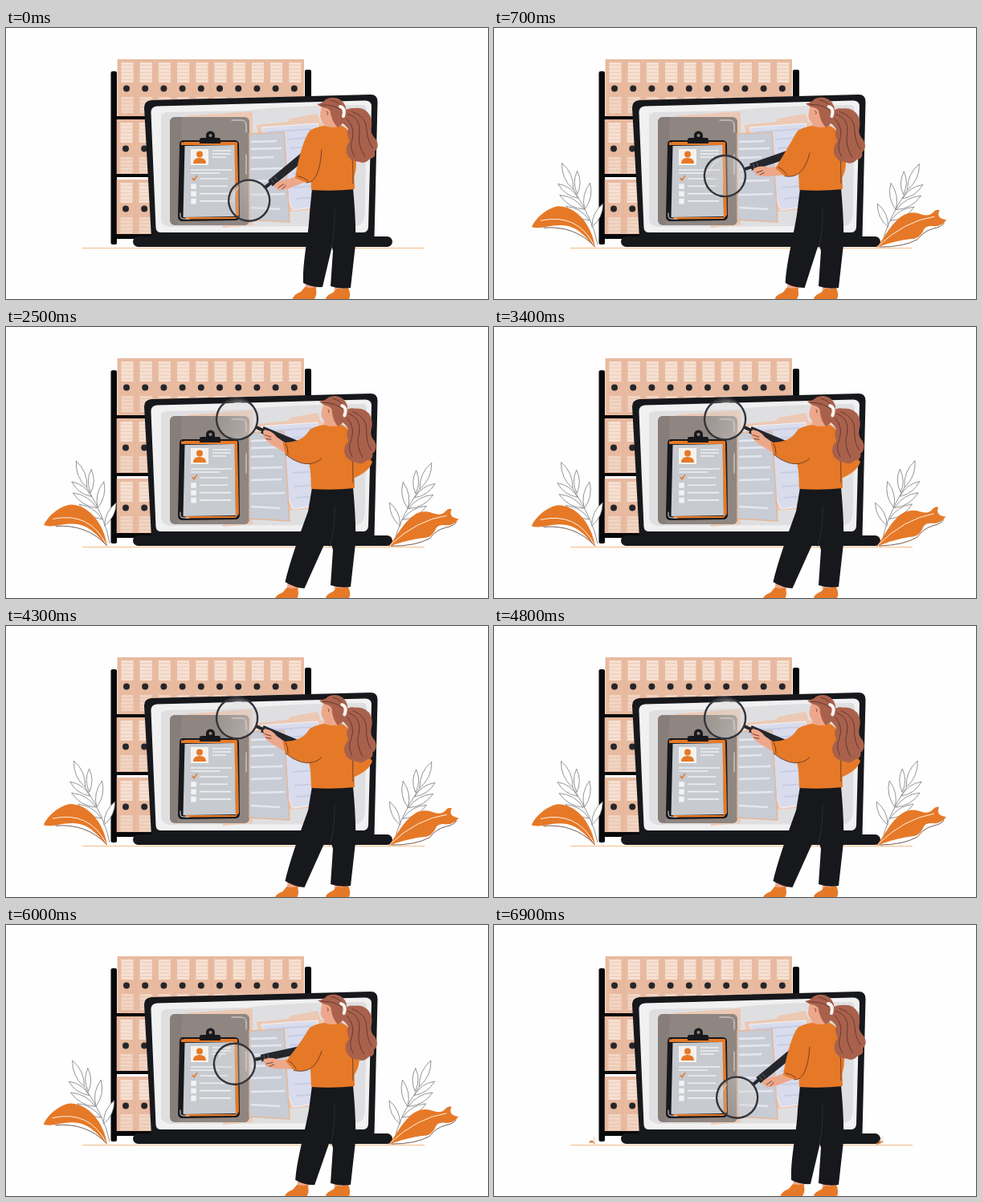
An HTML page that plays this animation: 600x338 px, repeating every 7000 ms.

```html
<!DOCTYPE html>
<html lang="en">
<head>
<meta charset="utf-8">
<title>Searching the archive</title>
<style>
  html, body { margin: 0; height: 100%; overflow: hidden; background: #fefefe; }
  svg { display: block; width: 100vw; height: 100vh; }
  .thin { fill: none; stroke: #55322a; stroke-width: .8; stroke-linecap: round; }
  .vein { fill: none; stroke: #fff; stroke-width: .9; }
  .orange { fill: #e67927; }
  .skin { fill: #eda78a; }
  .dark { fill: #17181c; }
</style>
</head>
<body>
<svg viewBox="0 0 600 338">
  <defs>
    <linearGradient id="glass">
      <stop offset="0" stop-color="#c9c5c3" stop-opacity=".2"/>
      <stop offset="1" stop-color="#dedbd9" stop-opacity=".5"/>
    </linearGradient>
  </defs>

  <path d="M95 274.5H521" stroke="#f3bd88"/>
  <g id="shelf"></g>

  <g id="laptop">
    <path class="dark" d="M181 90L454 83Q463 83 462.500 93L458.500 262H181L172 99Q172 91 181 90Z"/>
    <path fill="#f1f1f2" d="M188 97.500L447 90.500Q455 90.500 455 98L451 249Q450 255 444 255H193Q187 255 186.500 249L180.500 106Q180 98 188 97.500Z"/>
    <path fill="#dfdfe1" d="M193 112Q192 106 200 105L300 103Q340 97 445 96Q450 97 449 106L447 230Q446 246 436 247L206 248Q193 247 193 238Z"/>
    <rect class="dark" x="158" y="260" width="323" height="13" rx="6.500"/>
  </g>

  <g id="folders">
    <path fill="#ecc9b4" d="M222 110L304 104Q307 104 307 108V246L270 249V120ZM312 121L351 117L354 113L388 107L392 118H402V225L352 229L316 150Z"/>
    <path fill="#d9dcec" stroke="#f4f4f8" d="M318 124L388 119L394 222L357 227Z"/>
    <rect x="204" y="111" width="99" height="135" rx="6" fill="#8f8681"/>
    <path fill="#877e7a" d="M204 118Q204 111 211 111H219L214 246Q204 246 204 238Z"/>
    <path fill="none" stroke="#e4e0de" stroke-linecap="round" d="M281 115H293Q299 115 299 122V130M299 158V182"/>
    <path fill="#c8ccd5" stroke="#e4b696" stroke-width="1.500" d="M303 132L346 130L353 242L303 239Z"/>
    <path fill="none" stroke="#e4e7f0" stroke-width="2.500" d="M305 142L337 141M305 151L343 150M305 162L333 161M305 176L344 175M305 191L343 190M305 208L347 207M305 224L341 226"/>
    <path fill="none" stroke="#c6cde5" stroke-width="2" d="M325 130L380 126M350 139L386 136M353 150L383 148M356 166L386 164M357 182L388 180M359 199L388 197M361 213L386 211"/>
  </g>

  <g id="clipboard">
    <path class="dark" d="M220 140H285Q290 140 290 146L291 234Q291 240 285 240L220 241Q214 241 214 235L216 146Q216 140 220 140Z"/>
    <path class="orange" d="M222 142H285Q288 142 288 145L290 233L286 238L224 238.500L222 235Z"/>
    <path class="dark" d="M222 146H284L286 236L221 236Z"/>
    <path fill="#c7cacf" d="M222.500 147L284.500 146L286 235L220.500 236Z"/>
    <path class="orange" d="M218 142.500H288V146H218Z"/>
    <path class="dark" d="M241 144V139Q241 137 244 137H249V134A5.500 5.500 0 0 1 260 134V137H265Q267 137 267 140V144Z"/>
    <circle cx="254.500" cy="134" r="2" fill="#8f8681"/>
    <path fill="#f5f2ee" d="M230 151H252V171H230Z"/>
    <circle class="orange" cx="241" cy="157.500" r="4"/>
    <path class="orange" d="M233 169Q233 162 241 162Q249 162 249 169Z"/>
    <g id="form" fill="#f4f4f5" stroke="#f0f0f2" stroke-width="1.600"></g>
    <path fill="none" stroke="#e67927" stroke-width="1.500" d="M232 187L234 190L238 184"/>
    <path fill="none" stroke="#dddddf" stroke-linecap="round" d="M217 231V235Q217 238 221 238H228"/>
  </g>

  <g id="sprigL"></g>
  <g id="leafL">
    <path class="orange" d="M126 274C122 246 103 222 80 222C65 224 50 239 47 248C60 252 72 243 92 247C108 251 117 264 126 274Z"/>
    <path class="vein" d="M125 272Q104 230 58 240"/>
    <path class="thin" d="M62 249Q100 246 125 272"/>
  </g>
  <g id="sprigR"></g>
  <g id="leafR">
    <path class="orange" d="M476 274C486 262 496 238 513 231Q523 228 530 231Q541 235 546 229Q550 224 554 226Q551 233 556 236Q560 238 563 238Q556 247 547 246Q538 245 535 250Q531 260 523 262Q501 264 476 274Z"/>
    <path class="vein" d="M478 272Q511 240 548 234"/>
    <path class="thin" d="M480 273Q509 273 527 263Q535 252 547 249Q557 247 560 242"/>
  </g>

  <g id="shoeL">
    <path class="skin" d="M373 316H390L385 328H372Z"/>
    <path class="orange" d="M357 338Q357 333 367 329L372 323Q379 325 385 323Q388 331 385 336L384 338Z"/>
  </g>
  <path class="skin" d="M408 318H426V329H409Z"/>
  <path class="orange" d="M398 338Q399 333 407 330L412 325Q419 327 426 324Q430 333 427 338Z"/>
  <path id="legL" class="dark"/>
  <path class="dark" d="M395 200H432Q436 243 435 270L429 324Q415 326 404 322L407 278L396 240Z"/>
  <path id="fold" fill="none" stroke="#34353b" stroke-width=".7"/>

  <path id="armR" class="orange"/>
  <path class="skin" d="M397 111L418 108V126Q407 130 396 124Z"/>
  <path class="orange" d="M378 128Q387 123 396 122Q407 126 418 122Q430 127 432 145L434 201Q408 204 380 202L379 180Q373 150 378 128Z"/>
  <path class="thin" d="M429 147Q433 170 432 194"/>

  <g id="arm">
    <g id="handle">
      <path fill="#25262b" d="M-88 -2H-79V-4.500L-24 -5V5L-79 4.500V2H-88Z"/>
      <path fill="none" stroke="#5b5c62" d="M-75 -3V3M-70 -3V3"/>
    </g>
    <circle cx="-113" cy="0" r="25.500" fill="url(#glass)" stroke="#33343a" stroke-width="2.400"/>
    <path fill="none" stroke="#f1efee" stroke-width="1.200" opacity=".6" d="M-130 -10Q-125 -19 -114 -21"/>
    <path class="skin" d="M-45 10L-59 6Q-67 0 -76 2Q-79 5 -75 8Q-78 10 -73 12Q-65 17 -57 18L-41 22Z"/>
    <path class="thin" d="M-74 8L-66 8M-71 12L-65 11"/>
  </g>
  <path id="sleeve" class="orange"/>
  <path id="crease" class="thin"/>

  <g id="head">
    <path class="skin" d="M393 98Q391 104 391 110Q392 118 399 121L413 120L418 101L405 92Z"/>
    <path fill="#a9614c" d="M387 95Q394 94 398 89Q408 84 417 90Q425 96 423 108Q421 120 413 124Q407 118 405 110Q403 101 399 100Q392 99 387 95Z"/>
    <path class="skin" d="M398 101Q404 101 404 106Q403 111 399 110Z"/>
    <path class="thin" d="M399 104Q402 105 400 108M392 96Q407 95 417 102M404 90Q415 92 419 99"/>
    <path fill="#a9614c" d="M419 106Q424 99 433 100Q447 98 453 109Q457 117 454 126Q455 134 460 138Q466 148 459 154Q461 162 453 163Q447 170 440 167Q428 167 424 156Q422 148 428 141Q423 133 426 126Q421 119 417 118Q416 111 419 106Z"/>
    <path class="thin" d="M425 107Q442 112 440 130Q437 146 447 160M430 104Q449 110 449 127Q450 142 457 150M424 113Q435 124 431 139Q427 150 434 160"/>
    <path fill="none" stroke="#faf5f1" stroke-width="4" stroke-linecap="round" d="M416 98Q423 100 420 110"/>
  </g>
</svg>

<script>
const LOOP = 7000, STEP = 100;
const PIVOT = [395, 150];
const $ = id => document.getElementById(id);
const clamp = x => Math.min(1, Math.max(0, x));
const progress = (t, start, end) => clamp((t - start) / (end - start));
const softEase = x => (x + x * x * (3 - 2 * x)) / 2;
const wave = (t, period, peak) => Math.cos((t - peak) / period * 2 * Math.PI);
const rect = (x, y, w, h, fill) => `<rect x="${x}" y="${y}" width="${w}" height="${h}" fill="${fill}"/>`;

function binder(x, y, height) {
  let s = rect(x, y, 23.2, height, '#e8baa0') + rect(x + 4.5, y + 4, 15, 25, '#f6e0d2');
  for (let i = 0; i < 5; i++) s += rect(x + 5, y + 7 + i * 4.5, 14, 1, '#ecccb8');
  s += `<path d="M${x} ${y}v${height}" stroke="#dfae93" stroke-width=".6"/>`;
  s += `<circle cx="${x + 11}" cy="${y + 36.5}" r="4" fill="#25262b"/>`;
  s += rect(x + 4.5, y + 47, 15, 20, '#f1d5c4');
  for (let i = 0; i < 4; i++) s += rect(x + 4.5, y + 50 + i * 4.5, 15, 1, '#e8c2ab');
  return s;
}

function buildShelf() {
  const black = '#08090b';
  let s = '<rect x="130.500" y="54" width="7.500" height="216" rx="2" fill="#08090b"/>' +
    '<rect x="372" y="52" width="8" height="60" rx="2" fill="#08090b"/>';
  for (let i = 0; i < 10; i++) s += binder(139 + i * 23.2, 39, 71);
  for (let i = 0; i < 2; i++) s += binder(138 + i * 23.2, 114, 68) + binder(138 + i * 23.2, 189, 68);
  for (const y of [110, 182, 257]) s += rect(133, y, 50, y === 257 ? 6 : 4, black);
  $('shelf').innerHTML = s;
}

function buildForm() {
  let d = 'M257 153H280M257 157H280M257 161H274M230 177H281M230 181H266';
  for (let y = 188; y < 220; y += 9.3) d += `M241 ${y}H${y < 200 ? 276 : 280}`;
  for (let y = 195; y < 220; y += 9.3) d += `M231 ${y}h5v5h-5z`;
  $('form').innerHTML = `<path d="${d}"/>`;
}

function leaf(x1, y1, x2, y2) {
  const mx = (x1 + x2) / 2, my = (y1 + y2) / 2;
  const nx = (y1 - y2) * .24, ny = (x2 - x1) * .24;
  return `M${x1} ${y1}Q${mx + nx} ${my + ny} ${x2} ${y2}Q${mx - nx} ${my - ny} ${x1} ${y1}`;
}

function buildSprigs() {
  const leaves = [
    [99, 201, 85, 168], [105, 212, 80, 194], [104, 207, 104, 178], [112, 226, 82, 208],
    [113, 226, 120, 193], [119, 240, 90, 222], [122, 248, 136, 219]
  ].map(ends => leaf(...ends)).join('');
  const sprig = `<path d="M129 270Q124 240 99 201" fill="none"/><path d="${leaves}"/>`;
  const style = 'fill="#fff" stroke="#66676c" stroke-width=".7"';
  $('sprigL').innerHTML = `<g ${style}>${sprig}</g>`;
  $('sprigR').innerHTML = `<g ${style} transform="matrix(-1 0 0 1 612 0)">${sprig}</g>`;
}

function place(id, x, y, angle, scale = 1) {
  $(id).setAttribute('transform', `translate(${x} ${y}) rotate(${angle}) scale(${scale}) translate(${-x} ${-y})`);
}

function drawPlants(t) {
  const grow = 1 - (1 - progress(t, 0, 800)) ** 3;
  const shrink = 1 - progress(t, 6350, 6930) ** 2;
  const size = grow * shrink;
  const left = 1.3 * wave(t, 1400, 2500), right = 1.6 * wave(t, 1900, 2450);
  place('sprigL', 127, 273, left, size);
  place('leafL', 126, 274, left * .4, size);
  place('sprigR', 480, 273, right, size);
  place('leafR', 476, 274, right * .6, size);
}

function drawWoman(raise) {
  const angle = -35.2 + 53.3 * raise, a = angle * Math.PI / 180;
  const turn = (x, y) => [
    PIVOT[0] + x * Math.cos(a) - y * Math.sin(a),
    PIVOT[1] + x * Math.sin(a) + y * Math.cos(a)
  ];
  $('arm').setAttribute('transform', `translate(${PIVOT}) rotate(${angle})`);
  place('handle', -113, 0, -4 + 9 * raise);

  const top = turn(-50, 10), bottom = turn(-42, 23);
  const under = `Q${390 - 15 * raise} ${194 - 14 * raise} 393 ${152 + 12 * raise}`;
  $('sleeve').setAttribute('d', `M390 124Q380 125 376 131Q${366 + 2 * raise} ${150 - 6 * raise} ${top}L${bottom}${under}Z`);
  $('crease').setAttribute('d', `M${bottom}${under}M${turn(-46, 10)}Q${turn(-41, 15)} ${turn(-39, 22)}`);

  place('head', 415, 125, 5 * raise);
  $('armR').setAttribute('d', `M430 140L${436 + 20 * raise * raise} 168Q${436 + 17 * raise * raise} 180 432 189Z`);

  const step = 22.5 * raise;
  $('shoeL').setAttribute('transform', `translate(${-step} ${raise * 2})`);
  $('legL').setAttribute('d', `M381 200H420L${406 - 3 * raise} ${272 - 16 * raise}L${394 - step} ${323 + 3 * raise}` +
    `Q${381 - step} ${324 + raise} ${370 - step} 318` +
    `C${369 - 15 * raise} 290 ${377 - 11 * raise} 258 ${378 - 2 * raise} 230L381 200Z`);
  $('fold').setAttribute('d', `M409 223Q410 250 ${405 - step * .1} 274`);
}

function frame(now) {
  const t = Math.floor(now / STEP) * STEP % LOOP;
  const raise = softEase(progress(t, 0, 1950)) - softEase(progress(t, 4900, 6900));
  drawPlants(t);
  drawWoman(raise);
  requestAnimationFrame(frame);
}

buildShelf();
buildForm();
buildSprigs();
frame(0);
</script>
</body>
</html>
```
